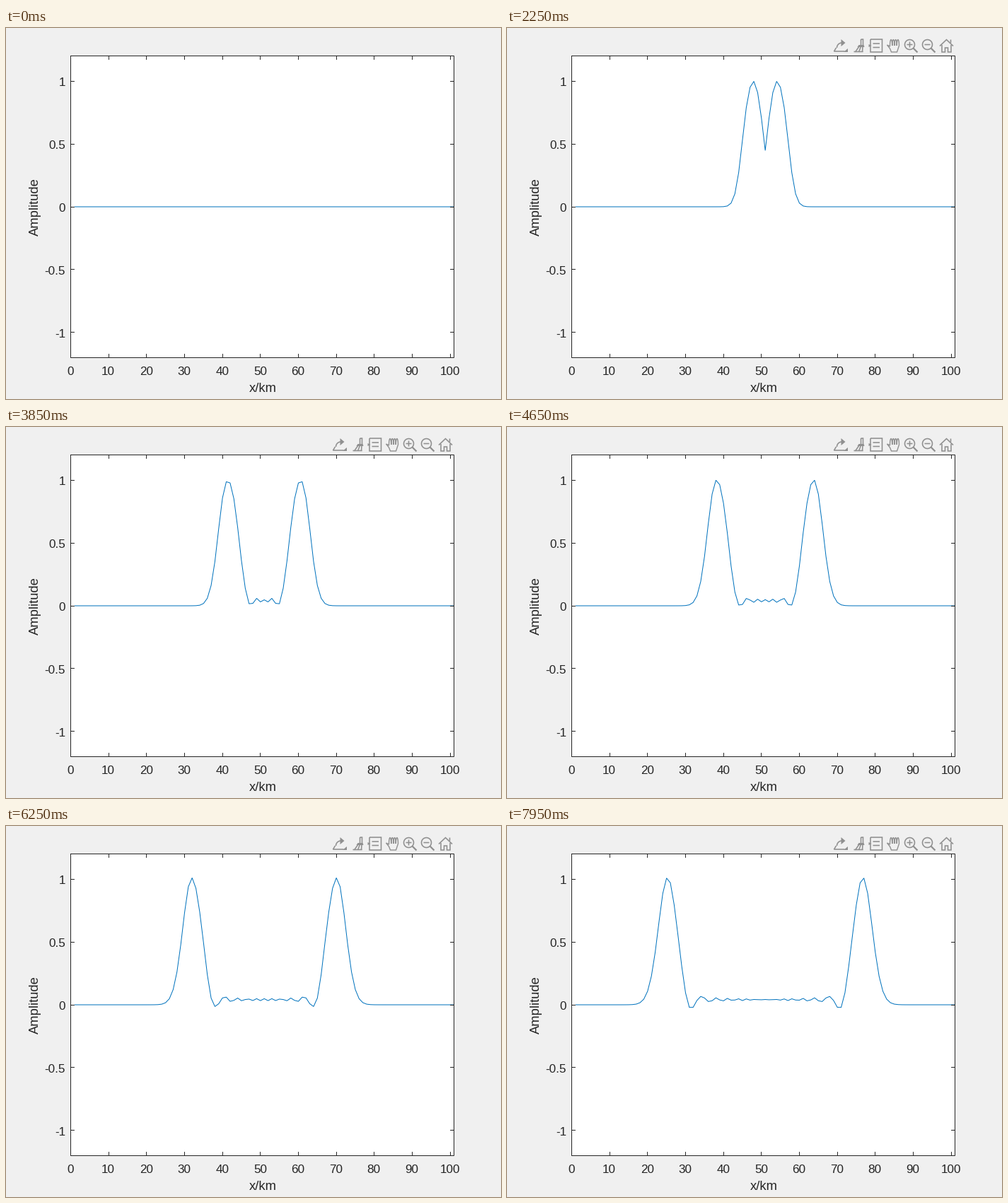
A matplotlib script for the animation above (8000 ms loop, 700x525 px).

```python
import numpy as np
import matplotlib.pyplot as plt
from matplotlib.animation import FuncAnimation

W, H, DPI = 700, 525, 100
PT = 72 / DPI                                # points per pixel
INK, BLUE, GREY = "#262626", "#0072BD", "#909090"
LEFT, RIGHT, TOP, BOTTOM = 91.5, 633.5, 39.5, 466.5
STEPS = 80

plt.rcParams["font.family"] = "Liberation Sans"
fig = plt.figure(figsize=(W / DPI, H / DPI), dpi=DPI, facecolor="#F0F0F0")
ax = fig.add_axes([0, 0, 1, 1])
ax.set(xlim=(0, W), ylim=(H, 0))
ax.axis("off")


def px(x):
    return LEFT + (RIGHT - LEFT) * x / 101


def py(y):
    return (TOP + BOTTOM) / 2 - (BOTTOM - TOP) * y / 2.4


def pixel(v):
    return np.floor(v) + 0.5


def stroke(xs, ys, color=INK, width=1.0, **kw):
    kw = dict(solid_capstyle="butt", solid_joinstyle="miter", zorder=4, snap=False) | kw
    return ax.plot(xs, ys, color=color, lw=width * PT, **kw)[0]


def label(x, y, text, size=17.1, **kw):
    ax.text(x, y, text, fontsize=size * PT, color=INK, va="baseline", **kw)


def simulate(steps, courant=0.4, nodes=101, period=30):
    """1-D wave equation driven at the middle node by one raised-cosine pulse."""
    mid = nodes // 2
    states = [np.zeros(nodes)]
    before = now = states[0]
    for k in range(1, steps + 1):
        after = np.zeros(nodes)
        bend = now[2:] - 2 * now[1:-1] + now[:-2]
        after[1:-1] = 2 * now[1:-1] - before[1:-1] + courant**2 * bend
        if k < period:
            after[mid] = np.sin(np.pi * k / period) ** 2
        before, now = now, after
        states.append(after)
    return states


def draw_axes():
    frame_x, frame_y = [LEFT, RIGHT, RIGHT, LEFT, LEFT], [TOP, TOP, BOTTOM, BOTTOM, TOP]
    ax.fill(frame_x, frame_y, color="white", lw=0, zorder=0)
    stroke(frame_x, frame_y, solid_capstyle="projecting")
    tick = 0.01 * (RIGHT - LEFT)
    for x in range(0, 101, 10):
        for edge, inward in ((TOP, tick), (BOTTOM, -tick)):
            stroke([pixel(px(x))] * 2, [edge, edge + inward])
        label(px(x) - 0.5, 491, str(x), ha="center")
    for y in np.arange(-1, 1.1, 0.5):
        for edge, inward in ((LEFT, tick), (RIGHT, -tick)):
            stroke([edge, edge + inward], [pixel(py(y))] * 2)
        label(84, py(y) + 7, f"{y:g}", ha="right")
    label(363, 515, "x/km", 18.33, ha="center")
    label(46, 253.5, "Amplitude", 18.33, ha="center", rotation=90, rotation_mode="anchor")


class Icon:
    """Draws around its own centre and collects the artists in a shared list."""

    def __init__(self, slot, parts):
        self.x, self.y, self.parts = 471.5 + 25 * slot, 25, parts

    def line(self, xs, ys, width=1.6):
        self.parts.append(stroke(self.x + np.array(xs), self.y + np.array(ys), GREY, width))

    def fill(self, xs, ys):
        self.parts += ax.fill(self.x + np.array(xs), self.y + np.array(ys), color=GREY, lw=0)

    def box(self, left, top, right, bottom):
        self.line([left, right, right, left, left], [top, top, bottom, bottom, top])

    def arc(self, cx, cy, rx, ry, start=0, end=2):
        a = np.pi * np.linspace(start, end, 40)
        self.line(cx + rx * np.cos(a), cy + ry * np.sin(a))


def draw_toolbar():
    parts = []
    export, brush, tip, hand, zoom_in, zoom_out, home = (Icon(i, parts) for i in range(7))

    export.line([-6, -9, 6], [3, 8, 8])
    export.arc(2, 3, 7, 7, 1, 1.5)
    export.fill([1, 7, 1], [-9, -4, 1])
    export.fill([4, 10, 10], [9, 9, 4])

    brush.box(4, -9, 7, 0)
    brush.fill([1, 8, 9, -1], [-1, -1, 2, 2])
    for end in (-5, 0, 5):
        brush.line([end + 1, 4 + end / 2], [9, 1])
    brush.line([-6, 7], [8.5, 8.5])

    tip.box(-7.5, -9, 9, 9)
    for y in (-3, 2.5):
        tip.line([-4, 5.5], [y, y])
    tip.fill([-10, -6, -10], [-2, 0, 2])

    u = np.linspace(0, 1, 81)
    fingers = -8.5 * np.abs(np.sin(4 * np.pi * u)) ** 0.4
    hand.line([-5, -9, -5, *(13 * u - 5), 5, -3, -5], [4, -1, 1, *fingers, 9, 9, 4], 1.4)

    for zoom in (zoom_in, zoom_out):
        zoom.arc(-2, -1.5, 7, 7)
        zoom.line([3, 9], [3.5, 9.5], 2.2)
        zoom.line([-6, 2], [-1.5, -1.5])
    zoom_in.line([-2, -2], [-5.5, 2.5])

    home.line([-9.5, 0, 9.5], [0.5, -8.5, 0.5])
    home.line([-6.5, -6.5, -2, -2, 2, 2, 6.5, 6.5], [-1, 9, 9, 3, 3, 9, 9, -1])
    home.line([6, 6], [-8.5, -4])
    return parts


waves = simulate(STEPS)
draw_axes()
toolbar = draw_toolbar()
curve = stroke(px(np.arange(1, 102)), py(waves[0]), BLUE, zorder=3)


def update(i):
    step = (i + 1) // 2
    curve.set_ydata(py(waves[step]))
    for part in toolbar:
        part.set_visible(step > 0)
    return [curve, *toolbar]


anim = FuncAnimation(fig, update, frames=2 * STEPS, interval=50, repeat=True, repeat_delay=0, blit=False)
plt.show()
```
